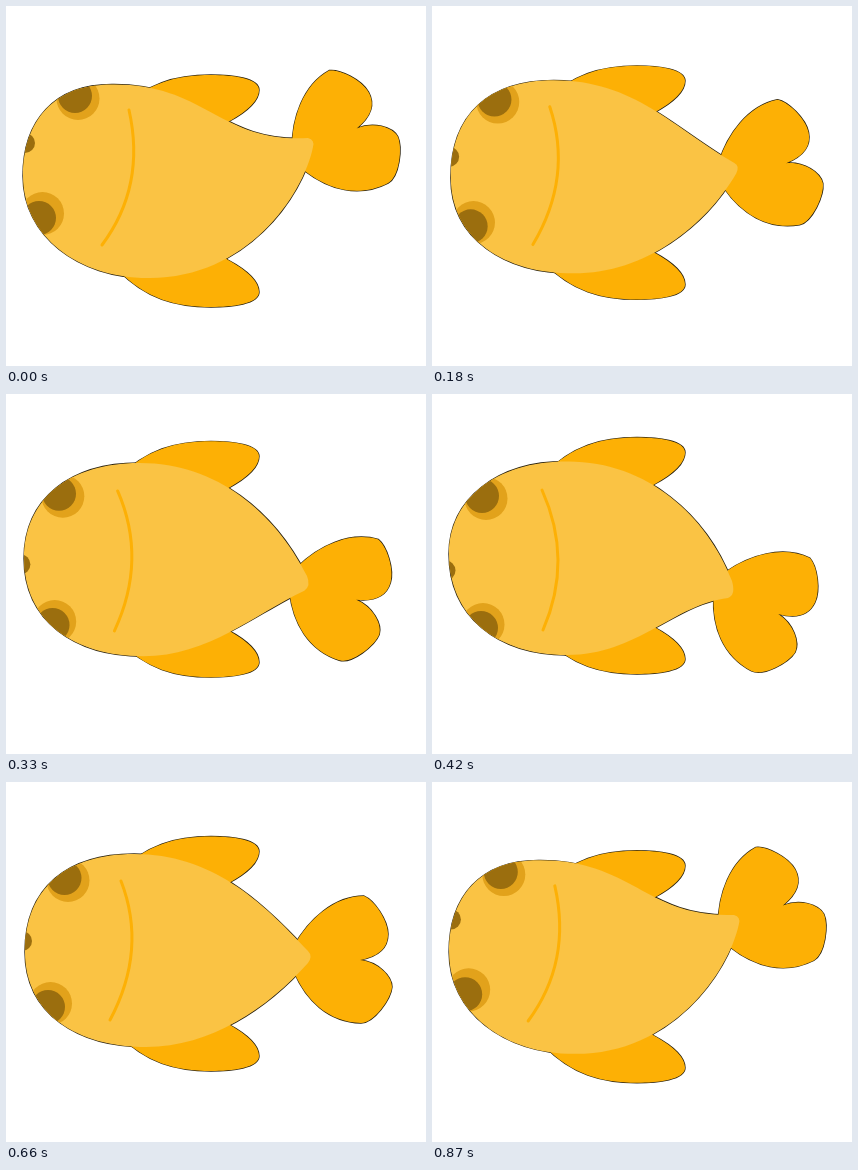
Animation of 420 by 360 pixels, one loop 0.9 s. Source, as an HTML page with a canvas:

```html
<!DOCTYPE html>
<html>
<head>
<meta charset="utf-8">
<style>
  html, body { margin: 0; overflow: hidden; background: #fff; }
  canvas { display: block; }
</style>
</head>
<body>
<canvas id="stage" width="420" height="360"></canvas>
<script>
const ctx = document.getElementById('stage').getContext('2d');
const LOOP = 900, STEP = 30;
const GOLD = '#fdb005', SKIN = '#fac344', RING = '#e2a21b', DARK = '#9b6e0e';

// Tail swing positions at which the three poses below are reached
const SWING = [0, 0.552, 0.989];

// Outline: nose, curve to top, curve to tail, rounded corner, curve to bottom, curve to nose
const BODY = [
  [17,170, 17,115,48,78,107,78.5, 200,78,214,137,302,132, 309,134,307,141,
   297,190,240,273,142,272, 72,272,17,230,17,170],
  [19,170, 19,105,62,72,128,72, 205,72,255,118,302,169, 307,174,302,181,
   262,226,205,265,140,265, 72,265,19,232,19,170],
  [17,160, 17,105,65,67,135,67.5, 215,67,275,122,300,187, 304,201,296,204,
   243,210,205,261,135,261, 65,261,17,222,17,160]
];
const MOUTH = [
  [123,104, 140,180, 96,239],
  [115,99, 141.5,167.5, 104,238],
  [110,96, 141.5,166, 111,236]
];
const SPOTS = [
  { r: 21.5, color: RING, at: [[72,92.5], [62,98.5], [54,104.5]] },
  { r: 17, color: DARK, at: [[69,90], [58.5,96], [50,102]] },
  { r: 21.5, color: RING, at: [[36.5,207.5], [44.5,221.5], [51,230.5]] },
  { r: 17, color: DARK, at: [[33,212], [42,225], [49,234]] },
  { r: 10, color: DARK, at: [[19,137], [16,159], [13.5,176.5]] }
];
// x, y, angle of the tail joint, then the shifts of the upper and lower fin
const JOINTS = [[302,146,-29, 0,0], [300,175,0, -14.5,-12], [299,193.5,26, -25.5,-21]];

const TAIL = new Path2D(`M288 164C302 138 328 114 358 114C368 118 382 138 382 152
  C382 168 370 175 354 178C372 180 386 194 386 205C385 217 368 241 355 241
  C322 240 300 218 288 190Z`);
const FIN = new Path2D(`M112 106C140 77 170 69 205 69C226 69 253 72 253 84
  C253 96 237 108 222 116L190 140Z`);

// Quadratic blend through three poses
function blend(poses, s) {
  const weights = SWING.map((a, i) =>
    SWING.reduce((w, b, j) => i === j ? w : w * (s - b) / (a - b), 1));
  return poses[0].map((_, k) => poses.reduce((sum, pose, i) => sum + pose[k] * weights[i], 0));
}

function bodyPath(v) {
  const path = new Path2D();
  path.moveTo(v[0], v[1]);
  path.bezierCurveTo(...v.slice(2, 8));
  path.bezierCurveTo(...v.slice(8, 14));
  path.quadraticCurveTo(...v.slice(14, 18));
  path.bezierCurveTo(...v.slice(18, 24));
  path.bezierCurveTo(...v.slice(24, 30));
  path.closePath();
  return path;
}

function placed(path, matrix) {
  const result = new Path2D();
  result.addPath(path, matrix);
  return result;
}

function draw(time) {
  const phase = Math.floor(time % LOOP / STEP) * STEP / LOOP;
  const s = (1 - Math.cos(phase * 2 * Math.PI)) / 2;
  const [x, y, angle, upper, lower] = blend(JOINTS, s);
  const body = bodyPath(blend(BODY, s));
  const limbs = [
    placed(TAIL, new DOMMatrix().translate(x, y).rotate(angle).translate(-300, -175)),
    placed(FIN, new DOMMatrix().translate(0, upper)),
    placed(FIN, new DOMMatrix().translate(0, 370 + lower).scale(1, -1))
  ];

  ctx.fillStyle = '#fff';
  ctx.fillRect(0, 0, 420, 360);

  // Thin dark rim, left visible only around the silhouette
  ctx.strokeStyle = '#2b2310';
  ctx.lineWidth = 1.4;
  for (const shape of [...limbs, body]) ctx.stroke(shape);

  ctx.fillStyle = GOLD;
  for (const limb of limbs) ctx.fill(limb);
  ctx.fillStyle = SKIN;
  ctx.fill(body);

  ctx.save();
  ctx.clip(body);
  for (const { r, color, at } of SPOTS) {
    ctx.beginPath();
    ctx.arc(...blend(at, s), r, 0, 2 * Math.PI);
    ctx.fillStyle = color;
    ctx.fill();
  }
  ctx.restore();

  const mouth = blend(MOUTH, s);
  ctx.beginPath();
  ctx.moveTo(mouth[0], mouth[1]);
  ctx.quadraticCurveTo(...mouth.slice(2));
  ctx.strokeStyle = GOLD;
  ctx.lineWidth = 3;
  ctx.lineCap = 'round';
  ctx.stroke();
}

const start = performance.now();
function tick() {
  draw(performance.now() - start);
  requestAnimationFrame(tick);
}
tick();
</script>
</body>
</html>
```
